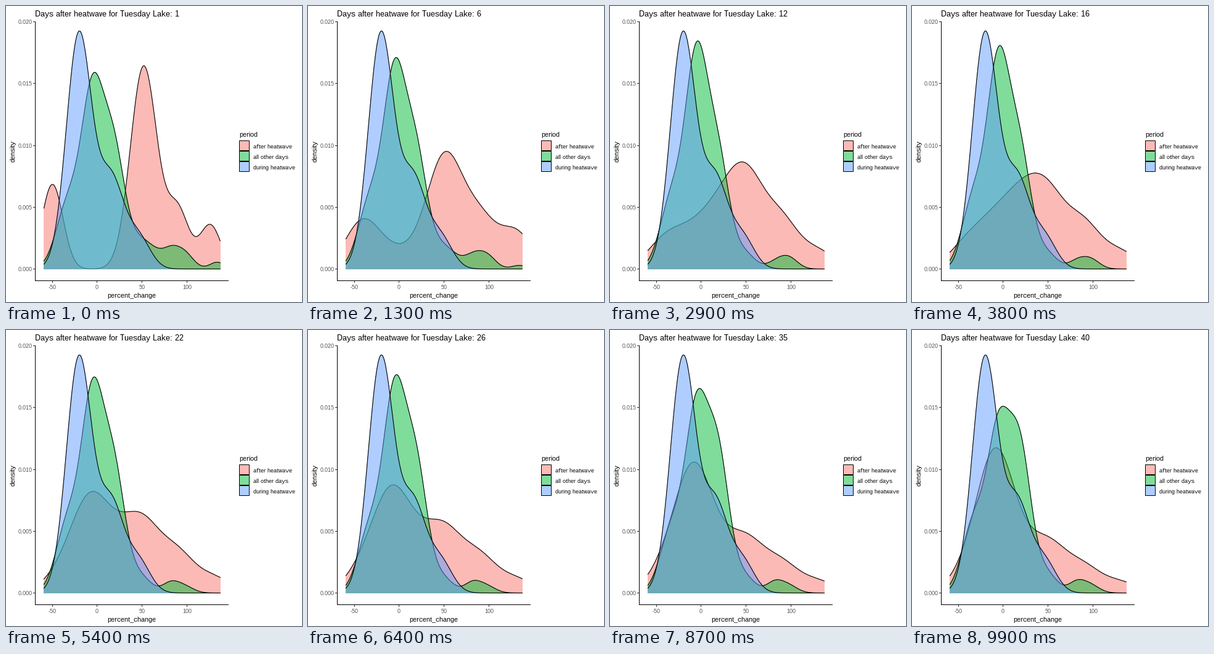
Recreate the animation shown at these times as a matplotlib script. Size 480 by 480 pixels, loop 10 s.

```python
import numpy as np
import matplotlib.pyplot as plt
from matplotlib.animation import FuncAnimation
from matplotlib.patches import Polygon, Rectangle

SIZE, DPI = 480, 80
PT = 72 / DPI                      # points per pixel
FRAMES, LAST_DAY = 100, 40
RED, GREEN, BLUE = "#F8766D", "#00BA38", "#619CFF"
GREY, TICK = "#4D4D4D", "#333333"

plt.rcParams.update({
    "font.family": "Liberation Sans",
    "text.hinting": "native",      # whole-pixel letter widths
    "text.hinting_factor": 1,
})


def px(change):
    return 147.8 + 1.455 * change


def py(density):
    return 426.5 - 20.04 * density  # density in thousandths


values = np.linspace(-59.3, 137.1, 300)


def hump(mean, sd, height):
    return height * np.exp(-0.5 * ((values - mean) / sd) ** 2)


# Each density is a sum of normal humps whose heights drift with the day.
# (mean, sd, height)
DURING = [(-20.3, 14, 18.95), (15.5, 14.2, 7.2), (46.4, 13, 2.45)]

# (mean, sd, heights on OTHER_DAYS)
OTHER_DAYS = [1, 12, 22, 31, 40]
OTHER = [
    (-32.6, 13.1, [5.1, 5.6, 5.6, 4.5, 5.6]),
    (-5.2, 12.4, [13.8, 16.5, 15.3, 15.6, 12.4]),
    (18.9, 12.4, [9.2, 8.6, 9.4, 10.4, 11.2]),
    (48.5, 11.7, [2.0, 1.2, 1.25, 1.0, 1.5]),
    (65.6, 9.6, [0.8, 0, 0, 0, 0]),
    (81.4, 9.0, [1.2, 0.4, 0.75, 0.8, 0.8]),
    (96.6, 10.3, [1.3, 1.0, 0.55, 0.6, 0.65]),
    (133.7, 8.2, [0.55, 0, 0, 0, 0]),
]

# (first mean, late mean, first sd, late sd, heights on AFTER_DAYS)
AFTER_DAYS = np.array([1, 6, 12, 16, 22, 31, 40])
AFTER = [
    (-49.8, -39.5, 11.7, 20.6, [6.85, 3.8, 2.25, 1.9, 1.25, 2.0, 1.4]),
    (-8.6, -8.6, 20.6, 20.6, [0, 1.0, 2.1, 3.1, 6.75, 7.9, 10.7]),
    (22.3, 22.3, 20.6, 20.6, [0, 0.7, 3.75, 4.6, 2.75, 2.1, 1.75]),
    (51.9, 51.5, 14.8, 20.6, [16.4, 8.9, 6.9, 5.0, 5.0, 4.0, 3.5]),
    (89.7, 90.4, 12.4, 19.2, [4.75, 3.7, 3.6, 3.3, 2.9, 2.45, 1.9]),
    (126.1, 131, 11.7, 19.2, [3.55, 3.0, 1.4, 1.35, 1.2, 1.0, 0.85]),
]


def other_days(day):
    return sum(hump(mean, sd, np.interp(day, OTHER_DAYS, heights))
               for mean, sd, heights in OTHER)


def after_heatwave(day):
    """A growing sample settles like 1 / day."""
    total = 0
    for mean1, mean, sd1, sd, heights in AFTER:
        height = np.interp(-1 / day, -1 / AFTER_DAYS, heights)
        total = total + hump(mean + (mean1 - mean) / day,
                             sd + (sd1 - sd) / day, height)
    return total


fig = plt.figure(figsize=(SIZE / DPI, SIZE / DPI), dpi=DPI, facecolor="white")
ax = fig.add_axes([0, 0, 1, 1])
ax.set_xlim(0, SIZE)
ax.set_ylim(SIZE, 0)
ax.axis("off")


def label(x, y, s, size, color="black", **kw):
    return ax.text(x, y, s, fontsize=size * PT, color=color, va="baseline", **kw)


def rule(x, y, color="black"):
    ax.plot(x, y, color=color, lw=PT, snap=False, solid_capstyle="butt")


class Density:
    def __init__(self, color, z):
        self.area = ax.add_patch(Polygon([[0, 0]], closed=True, lw=0, aa=False,
                                         fc=(color, 0.5), ec="none", zorder=z))
        self.line, = ax.plot([], [], color="black", lw=1.1 * PT, snap=False,
                             zorder=z + 0.5)

    def show(self, density):
        x, y = px(values), py(density)
        self.area.set_xy(np.column_stack([np.r_[x[0], x, x[-1]],
                                          np.r_[py(0), y, py(0)]]))
        self.line.set_data(x, y)


# Axes
rule([47.5, 47.5], [25, 446])
rule([47, 361], [445.5, 445.5])
for d in range(0, 21, 5):
    y = np.floor(py(d)) + 0.5
    rule([44, 47], [y, y], TICK)
    label(42.5, y + 3.5, f"{d / 1000:.3f}", 9, GREY, ha="right")
for v in (-50, 0, 50, 100):
    x = np.floor(px(v)) + 0.5
    rule([x, x], [446, 449], TICK)
    label(x, 459, str(v), 9, GREY, ha="center")
label(204, 473, "percent_change", 11, ha="center")
label(15, 235.5, "density", 11, ha="center", rotation=90, rotation_mode="anchor")
title = label(47, 17, "", 13)

# Legend
label(378, 212, "period", 11)
for i, (name, color) in enumerate([("after heatwave", RED),
                                   ("all other days", GREEN),
                                   ("during heatwave", BLUE)]):
    y = 218.5 + 17 * i
    ax.add_patch(Rectangle((378.5, y), 16, 16, fc=(color, 0.5), ec="black",
                           lw=PT, snap=False))
    label(401, y + 12.5, name, 9)

red, green, blue = Density(RED, 3), Density(GREEN, 4), Density(BLUE, 5)
blue.show(sum(hump(*h) for h in DURING))


def update(i):
    day = 1 + (LAST_DAY - 1) * i / (FRAMES - 1)
    title.set_text(f"Days after heatwave for Tuesday Lake: {round(day)}")
    red.show(after_heatwave(day))
    green.show(other_days(day))
    return title, red.area, red.line, green.area, green.line


anim = FuncAnimation(fig, update, frames=FRAMES, interval=100,
                     repeat=True, repeat_delay=0, blit=False)
plt.show()
```
